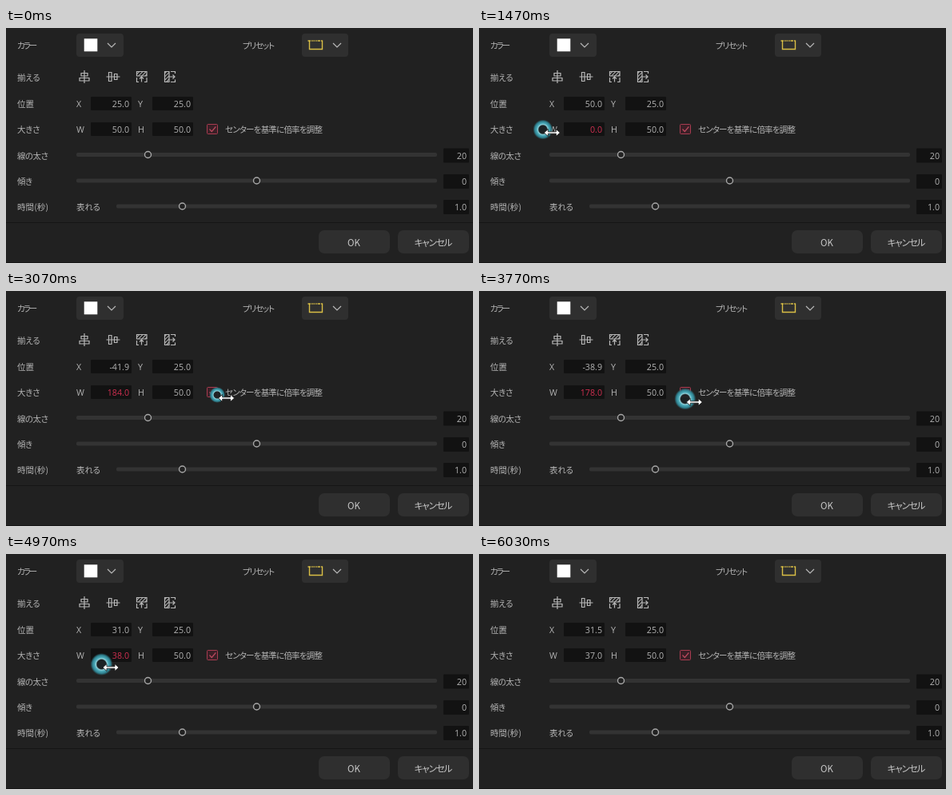
Animation of 584 by 294 pixels, one loop 6230 ms. Source, as an HTML page:

```html
<!DOCTYPE html>
<html lang="ja">
<meta charset="utf-8">
<style>
html, body { margin: 0; height: 100%; overflow: hidden; background: #212121; }
svg { display: block; width: 584px; height: 294px; }
text { font: 10.5px "Noto Sans CJK JP", "Noto Sans CJK", sans-serif; font-feature-settings: "palt"; fill: #b4b4b4; }
.num { font: 10.7px "Open Sans", sans-serif; text-anchor: end; }
.lat { font: 10.7px "Open Sans", sans-serif; }
.btn { font-size: 11.5px; font-weight: 500; fill: #c8c8c8; }
.on { fill: #cf2f50; }
.box { fill: #121212; }
.panel { fill: #2f2f2f; }
.line { fill: none; stroke: #b8b8b8; stroke-width: 1.2; }
</style>
<svg viewBox="0 0 584 294">
  <defs>
    <radialGradient id="glow">
      <stop offset="0" stop-color="#1b2224" stop-opacity=".9"/>
      <stop offset=".4" stop-color="#1b2224" stop-opacity=".9"/>
      <stop offset=".5" stop-color="#8fced6"/>
      <stop offset=".62" stop-color="#49a9b8"/>
      <stop offset=".82" stop-color="#2f7f8d"/>
      <stop offset="1" stop-color="#2a6a76" stop-opacity="0"/>
    </radialGradient>
    <pattern id="hatch" width="3" height="3" patternUnits="userSpaceOnUse" patternTransform="rotate(45)">
      <path d="M0 0V3" stroke="#b8b8b8" stroke-width="2"/>
    </pattern>
  </defs>
  <rect width="584" height="294" fill="#212121"/>
  <path d="M0 243.5H584M0 293.5H584" stroke="#151515"/>
  <g id="form"></g>

  <rect class="panel" x="88" y="7" width="59" height="29" rx="4"/>
  <rect class="panel" x="370" y="7" width="58" height="29" rx="4"/>
  <rect x="97.700" y="13.300" width="16.600" height="16" fill="#fff"/>
  <path class="line" d="M127 19l5 5 5-5M409 19l5 5 5-5"/>
  <path d="M379.500 16V26.500H395.500V15.500" fill="none" stroke="#d9be45" stroke-width="1.400"/>
  <path d="M377.500 16H396" stroke="#d9be45" stroke-width="1.400" stroke-dasharray="3.500 1 1.500 1 1.500 1 1.500 1"/>

  <g class="line">
    <path d="M98 53V69M94 56.500h8v3.500h-8zM92 62.500h12v3.500h-12z"/>
    <path d="M125.500 61H142.500M128.500 55.500h3.500v11h-3.500zM135.500 57.500h3.500v7h-3.500z"/>
    <path d="M163.500 54.500H176V60H163.500zM163.500 62V67.500H166M173 67.500H176V62M169.500 67.500V61M167 63.500l2.500-2.500 2.500 2.500"/>
    <path d="M198.500 54.500H204V67.500H198.500zM206 54.500H211.500V57M211.500 64.500V67.500H206M204.500 61H211M208.500 58.500l2.500 2.500-2.500 2.500"/>
  </g>
  <rect x="164" y="55" width="12" height="5" fill="url(#hatch)"/>
  <rect x="199" y="55" width="5" height="12" fill="url(#hatch)"/>

  <rect x="251.500" y="120.500" width="13" height="12" rx="1" fill="#3a1f26" stroke="#a83c50"/>
  <path d="M254.500 126.500l2.800 3 5-6" fill="none" stroke="#b94a5e" stroke-width="1.200"/>

  <circle id="ring" fill="url(#glow)"/>
  <path id="cursor" fill="#fff" stroke="#111" stroke-width=".8" stroke-linejoin="round"/>
</svg>
<script>
const $ = id => document.getElementById(id);
const form = $('form'), ring = $('ring'), cursor = $('cursor');
const add = (tag, attrs, text = '') => {
  const el = document.createElementNS('http://www.w3.org/2000/svg', tag);
  for (const k in attrs) el.setAttribute(k, attrs[k]);
  el.textContent = text;
  return form.appendChild(el);
};
const label = (x, y, text, gap = 0) => add('text', { x, y, style: `letter-spacing:${gap}px` }, text);
const field = (x, y, w, h, value) => {
  add('rect', { class: 'box', x, y, width: w, height: h, rx: 1 });
  return add('text', { class: 'num', x: x + w - 3, y: y + h / 2 + 4 }, value);
};
const slider = (x, y, knob, value) => {
  add('rect', { x, y: y - 2.5, width: 539 - x, height: 5, rx: 2, fill: '#333' });
  add('circle', { cx: knob, cy: y, r: 4, fill: '#222', stroke: '#a8a8a8', 'stroke-width': 1.4 });
  field(547, y - 8, 32, 18, value);
};
const button = (x, text, gap) => {
  add('rect', { class: 'panel', x, y: 253, width: 89, height: 29, rx: 7 });
  add('text', { class: 'btn', x: x + 44, y: 272.5, 'text-anchor': 'middle', style: `letter-spacing:${gap}px` }, text);
};

label(14, 26, 'カラー', -2);
label(296, 26, 'プリセット', -1.1);
label(14, 66, '揃える', -.2);
label(14, 99, '位置');
label(14, 131, '大きさ', -.3);
label(274, 131, 'センターを基準に倍率を調整', -.78);
label(14, 164, '線の太さ', -.5);
label(14, 196, '傾き', -.5);
label(14, 228, '時間(秒)', .1);
label(88, 228, '表れる', -.2);
for (const [x, y, s] of [[88, 99, 'X'], [165, 99, 'Y'], [88, 131, 'W'], [165, 131, 'H']])
  add('text', { class: 'lat', x, y }, s);
const posX = field(106, 86, 51, 17);
field(183, 86, 51, 17, '25.0');
const width = field(106, 118, 51, 17);
field(183, 118, 51, 17, '50.0');
slider(88, 158.5, 177.5, '20');
slider(88, 191, 313.5, '0');
slider(138, 223, 220.5, '1.0');
button(391, 'OK', 0);
button(490, 'キャンセル', -1.1);

const LOOP = 6230, PRESS = 730, RELEASE = 5430;
// time, x, y, ring radius
const path = [
  [0, 240, -30, 0], [600, 131, 127, 0], [730, 131, 127, 0], [800, 131, 127, 12],
  [1000, 131, 127, 13], [1470, 80, 127, 12.5], [2230, 17, 126, 14.5], [2300, 15, 126, 14],
  [3070, 264, 130, 10], [3350, 284, 132, 13], [4430, 176, 138, 14], [4970, 119.5, 138, 14],
  [5100, 118.5, 138, 13], [5430, 118.5, 138, 12], [6000, 200, 320, 0], [6230, 200, 320, 0]
];
const slope = (i, k) => {
  const a = path[i - 1], b = path[i], c = path[i + 1];
  if (!a || !c) return 0;
  const l = (b[k] - a[k]) / (b[0] - a[0]), r = (c[k] - b[k]) / (c[0] - b[0]);
  return l * r > 0 ? 2 * l * r / (l + r) : 0;
};
// smooth curve through the points, flat at turning points
const at = (t, k) => {
  const i = path.findIndex(p => p[0] > t) - 1;
  const a = path[i], b = path[i + 1], d = b[0] - a[0], u = (t - a[0]) / d, v = 1 - u;
  return v * v * (1 + 2 * u) * a[k] + u * u * (3 - 2 * u) * b[k]
    + d * u * v * (v * slope(i, k) - u * slope(i + 1, k));
};
const RESIZE = 'M-10 0l5-4.500v3.300H5v-3.300L10 0 5 4.500V1.200H-5V4.500z';
const ARROW = 'M0 0V15l3.500-3.300 2.300 5.300 2.300-1-2.300-5.200H11z';

function draw(t) {
  const x = at(t, 1), y = at(t, 2), cx = x + 11.5, cy = y + 4;
  const down = t >= PRESS && t < RELEASE;
  const w = t < 1000 ? 50 : t >= RELEASE ? 37 : Math.max(0, Math.round(1.01 * x - 82.7));
  width.textContent = w.toFixed(1);
  width.setAttribute('class', down ? 'num on' : 'num');
  posX.textContent = (50 - w * .4995).toFixed(1);
  ring.setAttribute('cx', x);
  ring.setAttribute('cy', y);
  ring.setAttribute('r', down ? at(t, 3) : 0);
  const over = cx > 106 && cx < 157 && cy > 118 && cy < 146;
  cursor.setAttribute('d', down || over ? RESIZE : ARROW);
  cursor.setAttribute('transform', `translate(${cx} ${cy})`);
}
const start = performance.now();
function tick() {
  draw((performance.now() - start) % LOOP);
  requestAnimationFrame(tick);
}
tick();
</script>
</html>
```
